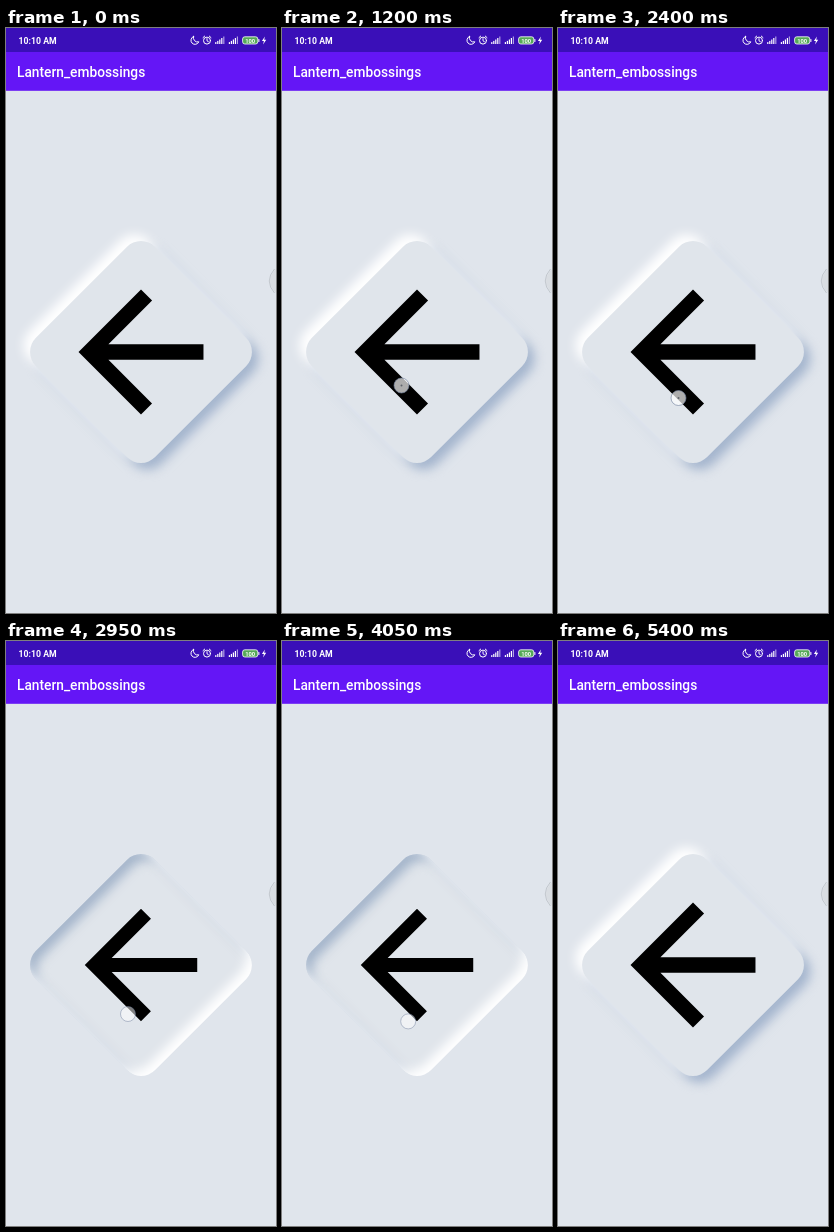
Recreate the animation shown at these times as an HTML page. Size 270 by 585 pixels, loop 5.6 s.

```html
<!DOCTYPE html>
<html lang="en">
<head>
<meta charset="utf-8">
<title>Soft button</title>
<style>
  html, body { margin: 0; width: 100%; height: 100%; overflow: hidden; background: #e0e5ec; }
  svg { display: block; width: 100%; height: 100%; }
  text { font-family: Roboto, sans-serif; fill: #fff; }
</style>
</head>
<body>
<svg viewBox="0 0 270 585" preserveAspectRatio="none">
  <defs>
    <filter id="soft" filterUnits="userSpaceOnUse" x="-20" y="160" width="310" height="330" color-interpolation-filters="sRGB">
      <feGaussianBlur stdDeviation="5.3"/>
    </filter>
    <rect id="tile" x="50.7" y="239.7" width="168.6" height="168.6" rx="20" transform="rotate(45 135 324)"/>
    <path id="frame" fill-rule="evenodd" transform="rotate(45 135 324)"
      d="M-65 124h400v400h-400z M70.7 239.7h128.6a20 20 0 0 1 20 20v128.6a20 20 0 0 1 -20 20h-128.6a20 20 0 0 1 -20 -20v-128.6a20 20 0 0 1 20 -20z"/>
    <clipPath id="inside"><use href="#tile"/></clipPath>
    <g id="signal" fill="#fff">
      <rect y="5.6" width="1.2" height="1.9"/>
      <rect x="2" y="4.4" width="1.2" height="3.1"/>
      <rect x="4" y="3" width="1.2" height="4.5"/>
      <rect x="6" y="1.5" width="1.2" height="6"/>
      <rect x="8" width="1.2" height="7.5" opacity=".6"/>
    </g>
  </defs>

  <rect width="270" height="585" fill="#e0e5ec"/>
  <rect width="270" height="62.8" fill="#6416f6"/>
  <rect width="270" height="24" fill="#3a0fb8"/>

  <text x="12.6" y="15.5" font-size="8.7" font-weight="700">10:10 AM</text>
  <text x="11" y="48.6" font-size="13.74" font-weight="500">Lantern_embossings</text>

  <g fill="none" stroke="#fff" stroke-width="1" stroke-linecap="round">
    <path d="M187.6 8.4a4.1 4.1 0 1 0 5.2 5.4a4.2 4.2 0 0 1 -5.2 -5.4z" stroke-linejoin="round"/>
    <circle cx="201" cy="12.6" r="3.5"/>
    <path d="M201 10.6v2.2l1.4 .9M197 9.6l1.7 -1.5M205 9.6l-1.7 -1.5"/>
  </g>
  <use href="#signal" x="209.2" y="8.5"/>
  <use href="#signal" x="222.8" y="8.5"/>
  <rect x="236.6" y="8.8" width="15.2" height="7.2" rx="2.2" fill="#55a957" stroke="#fff" stroke-width=".8"/>
  <rect x="252.4" y="10.9" width="1" height="3" rx=".5" fill="#fff"/>
  <text x="244.2" y="14.5" font-size="5.8" font-weight="700" text-anchor="middle">100</text>
  <path d="M258.9 8.4l-3 4.6h2l-.8 3.4l3.1 -4.6h-2z" fill="#fff"/>

  <path d="M270 241Q258 253 270 265z" fill="#d9dde2"/>
  <path d="M268.5 241Q258 253 268.5 265" fill="none" stroke="#bfc4ca" stroke-width=".9"/>

  <g id="raised">
    <g filter="url(#soft)"><use href="#tile" x="6.5" y="6.5" fill="#a3b4cd"/></g>
    <g filter="url(#soft)"><use href="#tile" x="-6.5" y="-6.5" fill="#fff"/></g>
    <use href="#tile" fill="#e0e5eb"/>
  </g>
  <g id="sunken" clip-path="url(#inside)">
    <use href="#tile" fill="#e0e5eb"/>
    <g filter="url(#soft)"><use href="#frame" x="6" y="6" fill="#a3b4ca"/></g>
    <g filter="url(#soft)"><use href="#frame" x="-6" y="-6" fill="#fff"/></g>
  </g>

  <path id="arrow" d="M20 11H7.83l5.59 -5.59L12 4l-8 8l8 8l1.41 -1.41L7.83 13H20z"/>

  <g id="touch">
    <circle id="spot" r="7.5" fill="#fff"/>
    <circle id="rim" r="7.5" fill="none" stroke="#72819e" stroke-width=".8"/>
    <circle id="dot" r="1" fill="#4c535d"/>
  </g>
</svg>
<script>
  const LOOP = 5600, STEP = 50, FADE = 250;
  const taps = [
    { x: 119.5, y: 357.5, down: 800, press: 950, up: 1150 },
    { x: 119.5, y: 357.5, down: 1400, press: 1550, up: 1850 },
    { x: 120.5, y: 370, down: 2000, press: 2150, up: 2350 },
    { x: 122, y: 373, down: 2600, press: 2750, up: 3050 },
    { x: 126.2, y: 380.4, down: 3900, press: 4050, up: 4450 },
    { x: 216, y: 519, down: 5050, press: Infinity, up: 5150 }
  ];
  const part = {};
  for (const id of ["raised", "sunken", "arrow", "touch", "spot", "rim", "dot"]) {
    part[id] = document.getElementById(id);
  }
  const show = (el, on) => el.setAttribute("visibility", on ? "visible" : "hidden");

  function drawButton(pressed) {
    show(part.raised, !pressed);
    show(part.sunken, pressed);
    const scale = 7.81 * (pressed ? 0.9 : 1);
    part.arrow.setAttribute("transform", `translate(135 324) scale(${scale}) translate(-12 -12)`);
  }

  function drawTouch(tap, t) {
    const visible = Boolean(tap) && t < tap.up + FADE;
    show(part.touch, visible);
    if (!visible) return;
    const lifted = t >= tap.up;
    const fade = lifted ? 1 - (t - tap.up) / FADE : 1;
    part.touch.setAttribute("transform", `translate(${tap.x} ${tap.y})`);
    part.spot.setAttribute("opacity", lifted ? 0.85 * fade : 0.5);
    part.rim.setAttribute("opacity", lifted ? fade : 0.6);
    part.dot.setAttribute("opacity", lifted ? fade : 0);
  }

  function draw(now) {
    const t = Math.floor((now % LOOP) / STEP) * STEP;
    drawButton(taps.some(p => t >= p.press && t < p.up));
    drawTouch(taps.filter(p => t >= p.down).pop(), t);
  }

  const start = performance.now();
  function tick() {
    draw(performance.now() - start);
    requestAnimationFrame(tick);
  }
  tick();
</script>
</body>
</html>
```
